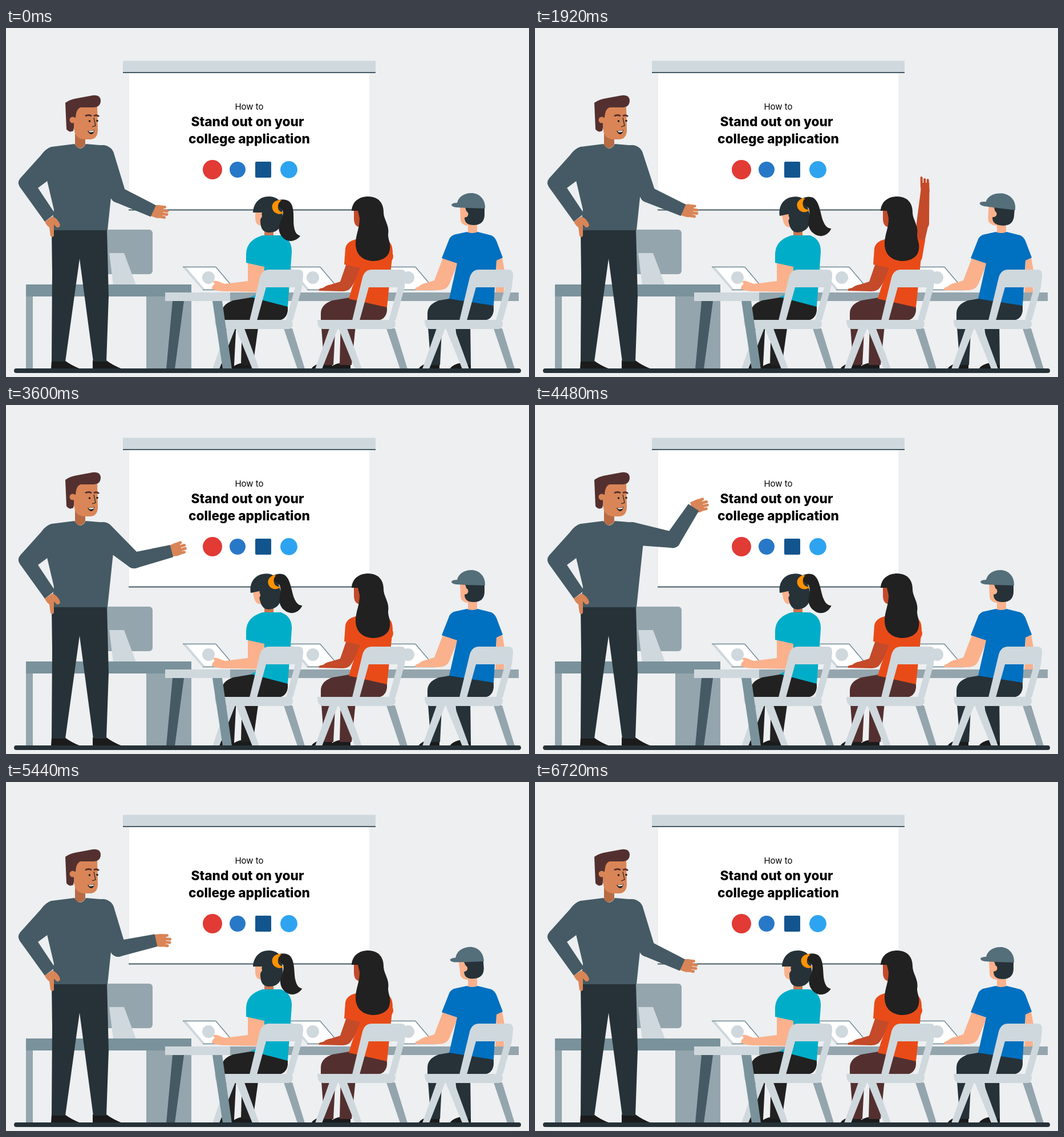
Recreate the animation shown at these times as an HTML page. Size 917 by 611 pixels, loop 8160 ms.

```html
<!DOCTYPE html>
<html lang="en">
<head>
<meta charset="utf-8">
<title>Classroom</title>
<style>
  html, body { margin: 0; width: 100%; height: 100%; overflow: hidden; background: #edeff1; }
  svg { display: block; width: 100vw; height: 100vh; }
  text { font-family: Inter, "Open Sans", sans-serif; text-anchor: middle; fill: #000; }
  .title { font-size: 22.7px; font-weight: 800; }
  .light { fill: #cfd8dd; }
  .grey { fill: #94a5ad; }
  .teal { fill: #7a929b; }
  .slate { fill: #455a64; }
  .navy { fill: #263238; }
  .black { fill: #212121; }
  .shoe { fill: #1b1b1b; }
  .tan { fill: #d98557; }
  .peach { fill: #fab18c; }
  .rust { fill: #c44a29; }
  .brown { fill: #53302f; }
  .cyan { fill: #00adc8; }
  .orange { fill: #e94b18; }
  .blue { fill: #0070c0; }
  .line { fill: none; stroke: #455a64; stroke-width: 2; }
</style>
</head>
<body>
<svg viewBox="0 0 917 611">
  <defs>
    <g id="chair">
      <path class="grey" d="M487 526H502L524 597H511Z"/>
      <path class="light" d="M427 512L445 437Q449 423 461 423H513Q522 423 521 434L519 454 503 512H491L507 454H456L440 512Z"/>
      <path class="light" d="M387 526H402L374 597H362ZM403 526H418L444 597H432Z"/>
      <path class="light" d="M366 511H496Q503 511 503 518T496 527H376Q366 527 366 511Z"/>
    </g>
    <g id="laptop">
      <path d="M310 418H367L401 458H345Z" fill="#fff" stroke="#b4c1c7"/>
      <path class="light" d="M310 418L345 458H349L315 418Z"/>
      <path d="M310 418.500H368L402 458.500H345" fill="none" stroke="#7a929b" stroke-width="1.500"/>
      <circle class="light" cx="355" cy="437" r="11"/>
    </g>
    <path id="thigh" d="M440 470L494 486V495Q492 512 474 512H404L400 590H384L378 511V500Q378 484 398 477Z"/>
    <path id="shoe" d="M384 586H400V597H363Q367 589 384 586Z"/>
    <g id="hand" transform="scale(.9)">
      <path d="M-4 -11L8 -13Q15 -14 19 -9V9Q14 13 6 12L-4 10Z"/>
      <path d="M8 -10L21 -11M14 -4H27M14 2.500H27M13 8.500L23 9" fill="none" stroke="#d98557" stroke-width="5.500" stroke-linecap="round"/>
    </g>
  </defs>

  <rect width="917" height="611" fill="#edeff1"/>

  <!-- screen -->
  <path fill="#fff" d="M216 79H637V318H216Z"/>
  <path class="light" d="M205 57.500H648V78H205Z"/>
  <path class="line" d="M205 78H648M215 318.500H637"/>
  <text x="426.500" y="143" font-size="15">How to</text>
  <text class="title" x="423.500" y="172">Stand out on your</text>
  <text class="title" x="426.500" y="202">college application</text>
  <circle cx="362" cy="248" r="17" fill="#e23a35"/>
  <circle cx="406" cy="248" r="14" fill="#2878c8"/>
  <rect x="437" y="234" width="28" height="28" rx="2" fill="#12558e"/>
  <circle cx="496" cy="248" r="15" fill="#2ea4f0"/>

  <!-- teacher's desk -->
  <rect class="grey" x="150" y="353" width="107" height="78" rx="6"/>
  <path class="light" d="M181 394H207L228 450H188Z"/>
  <path class="grey" d="M35 469H47V597H35ZM246 469H325V597H246Z"/>
  <path class="teal" d="M35 449H325V470H35Z"/>

  <!-- teacher -->
  <path class="shoe" d="M80 582H103Q115 591 131 597H79ZM152 582H176Q188 591 204 597H152Z"/>
  <path class="navy" d="M80 352H177L180 470 176 584H153L129 404 104 584H80L81 430Z"/>
  <path d="M121 180H139V204Q130 217 121 205Z" fill="#b66b44"/>
  <path class="slate" d="M80 208L120 203Q130 219 140 203L175 206 190 240 178 354H80L84 318 72 267 62 222Q70 211 80 208Z"/>
  <path class="slate" d="M80 208Q70 211 62 222L25 263Q19 270 24 278L68 339 86 325 56 280 75 266Z"/>
  <path class="tan" d="M68 339L81 330Q91 333 95 345 94 350 89 349L84 344V364Q81 368 78 364L76 349Q71 346 68 339Z"/>
  <path class="tan" d="M120 137H160L161 180Q160 195 147 195H135Q120 192 120 178Z"/>
  <path class="brown" d="M104 131Q112 125 125 123L152 118Q166 116 166 128 165 139 153 139H131Q123 141 122 157L118 180Q111 184 106 177Z"/>
  <circle class="tan" cx="117" cy="161" r="5.500"/>
  <path class="tan" d="M119 157H125V178H119Z"/>
  <path d="M139 154Q145 151 150 154M154 154Q159 151 163 155" fill="none" stroke="#53302f" stroke-width="2.800"/>
  <path d="M154 157L157 171 151 173" fill="none" stroke="#212121" stroke-width="1.200"/>
  <circle class="black" cx="146.500" cy="163" r="1.800"/>
  <circle class="black" cx="160" cy="162.500" r="1.800"/>
  <path class="black" d="M143 180Q149 181 155 178 154 186 149 186 145 185 143 180Z"/>
  <path d="M145 180.500Q150 181 154 179L153.500 181.500Q149 183 145.500 182Z" fill="#fff"/>
  <g id="palm" class="tan"><use href="#hand"/></g>
  <path id="upper" class="slate"/>
  <path id="fore" class="slate"/>

  <!-- long table -->
  <path class="grey" d="M370 463H899V478H370Z"/>
  <path class="light" d="M279 463H393V478H279Z"/>
  <use href="#laptop"/>
  <use href="#laptop" x="183"/>
  <use href="#laptop" x="350"/>

  <!-- girl with ponytail -->
  <g class="shoe"><use href="#shoe"/><use href="#shoe" x="32"/></g>
  <use href="#thigh" class="black"/>
  <path class="black" d="M414 511H444L433 590H412Z"/>
  <path d="M453 348H469V366H453Z" fill="#c9764f"/>
  <path class="peach" d="M424 410L454 414 448 455Q447 462 438 462L384 461Q371 461 361 457 361 451 366 448L363 444Q366 440 378 446L384 448 424 443Z"/>
  <path class="cyan" d="M450 363H482Q502 370 501 393L494 488 429 471 452 460 453 418 421 411V395Q422 371 450 363Z"/>
  <g id="girl">
    <path class="peach" d="M437 321H458V346H447Q437 345 437 332Z"/>
    <path class="navy" d="M433 323C434 306 445 295 460 295S484 303 484 316L485 330C485 346 478 358 462 358 451 358 446 352 446 336L449 323Z"/>
    <circle class="peach" cx="444" cy="329" r="5"/>
    <path id="tail" class="black" d="M470 303Q488 297 497 304C507 313 503 335 505 348 507 360 511 362 516 364 508 374 497 375 489 370 478 362 476 350 481 340 486 328 487 322 484 318Z"/>
    <path d="M480 301C468 302 464 311 468 319 472 326 482 328 487 323 479 322 476 318 477 311 478 306 480 304 483 302Z" fill="#ff9100"/>
  </g>
  <use href="#chair"/>
  <path class="slate" d="M292 478H312L296 597H281Z"/>
  <path class="teal" d="M362 478H379L396 597H380Z"/>

  <!-- girl with long hair -->
  <g id="raised">
    <path id="arm" class="rust"/>
    <path id="wrist" class="rust"/>
    <g id="fingers" class="rust">
      <path d="M-4 -7.500H13V7.500H-4Z"/>
      <path d="M6 -6H22M12 -.5H19M12 5H18" fill="none" stroke="#c44a29" stroke-width="4" stroke-linecap="round"/>
    </g>
    <path id="sleeve" class="orange"/>
  </g>
  <g class="shoe"><use href="#shoe" x="172"/><use href="#shoe" x="204"/></g>
  <use href="#thigh" x="174" class="brown"/>
  <path class="brown" d="M587 511H614L606 590H585Z"/>
  <path class="rust" d="M597 412L624 418Q612 445 605 454 601 461 590 461L549 460Q546 456 556 455 562 450 570 449L586 444Z"/>
  <path class="orange" d="M613 370H668Q678 378 678 392L668 489 601 474 607 454 621 420 593 414 595 386Q597 374 613 370Z"/>
  <path class="rust" d="M610 318H624V348H617Q610 345 610 334Z"/>
  <path class="black" d="M606 320C607 303 620 295 635 295 655 295 662 309 662 322 662 336 673 345 670 362 670 372 676 378 672 392 668 404 655 408 643 408 624 407 612 395 613 375 614 360 620 350 620 333L617 320Z"/>
  <use href="#chair" x="180"/>

  <!-- boy with cap -->
  <g class="shoe"><use href="#shoe" x="360"/><use href="#shoe" x="415"/></g>
  <use href="#thigh" x="361" class="navy"/>
  <path class="navy" d="M786 511H814L815 590H797Z"/>
  <path class="peach" d="M860 402L870 402 875 430 873 463H858ZM810 338H826V362H810Z"/>
  <path class="peach" d="M767 400L794 408 777 449Q772 459 759 459L718 459Q715 455 723 453 730 447 738 446L751 442Z"/>
  <path class="blue" d="M808 357Q817 361 827 357L851 363Q857 366 860 373L871 402 860 407 855 486 777 474 791 412 764 403 777 370Q779 365 785 362Z"/>
  <g id="boy">
    <path class="peach" d="M796 312H818V346H808Q797 344 797 335Z"/>
    <path class="navy" d="M805 314H839V328Q838 345 820 345 804 345 804 332L809 326Z"/>
    <circle class="peach" cx="805" cy="326" r="5.500"/>
    <path d="M791 306C793 296 803 289 816 289S841 299 840 316L808 315 789 314Q781 313 781 309 783 306 791 306Z" fill="#546e7a"/>
  </g>
  <use href="#chair" x="368"/>

  <rect class="navy" x="14" y="596" width="889" height="8" rx="4"/>
</svg>
<script>
const LOOP = 8160, STEP = 80;
const $ = id => document.getElementById(id);
const set = (id, name, value) => $(id).setAttribute(name, value);
const smooth = p => p * p * (3 - 2 * p);

// Keys are [time, value]; values ease between neighbours.
function track(t, ...keys) {
  let [t0, v0] = keys[0];
  for (const [t1, v1] of keys) {
    if (t < t1) return t <= t0 ? v0 : v0 + (v1 - v0) * smooth((t - t0) / (t1 - t0));
    t0 = t1;
    v0 = v1;
  }
  return v0;
}

function reach([x, y], angle, length) {
  const a = angle * Math.PI / 180;
  return [x + length * Math.cos(a), y + length * Math.sin(a)];
}

// Tapered limb, round at the start and optionally at the end.
function limb([ax, ay], ra, [bx, by], rb, round = true) {
  const d = Math.hypot(bx - ax, by - ay) || 1;
  const nx = (ay - by) / d, ny = (bx - ax) / d;
  const p = (x, y, r) => `${x + nx * r} ${y + ny * r}`;
  const end = round ? `A${rb} ${rb} 0 0 0 ` : 'L';
  return `M${p(ax, ay, ra)}L${p(bx, by, rb)}${end}${p(bx, by, -rb)}L${p(ax, ay, -ra)}A${ra} ${ra} 0 0 0 ${p(ax, ay, ra)}Z`;
}

const place = ([x, y], angle) => `translate(${x} ${y}) rotate(${angle})`;

// Curve through three values at p = 0, 0.5 and 1.
const through = (p, a, b, c) =>
  a * (1 - p) * (1 - 2 * p) + b * 4 * p * (1 - p) + c * p * (2 * p - 1);

function drawTeacher(t) {
  const up = track(t, [1840, 68.3], [2480, 42], [3520, 42], [4240, 9], [4800, 9], [5360, 68.3]);
  const fore = track(t, [1840, 24.8], [2560, 1], [3280, 1], [4240, -57], [4720, -57], [6080, 24.8]);
  const hand = track(t, [1840, 9], [2560, -18], [4240, -15], [4800, -15], [5440, 4], [6080, 9]);
  const shoulder = [170, 225];
  const elbow = reach(shoulder, up, 72);
  const wrist = reach(elbow, fore, 68);
  set('upper', 'd', limb(shoulder, 20, elbow, 14));
  set('fore', 'd', limb(elbow, 14, wrist, 11, false));
  set('palm', 'transform', place(wrist, hand));
}

function drawRaisedArm(t) {
  const p = track(t, [640, 0], [1600, 1], [2720, 1], [3440, 0]);
  const shoulder = [668, 400];
  const elbow = [through(p, 648, 687, 680), through(p, 430, 361, 342)];
  const wrist = [through(p, 640, 670, 684), through(p, 380, 322, 284)];
  const cuff = shoulder.map((v, i) => v + (elbow[i] - v) * .52);
  set('arm', 'd', limb(shoulder, 9, elbow, 10));
  set('wrist', 'd', limb(elbow, 11, wrist, 7.5));
  set('sleeve', 'd', limb(shoulder, 11, cuff, 10, false));
  set('fingers', 'transform', place(wrist, -91));
}

function drawHeads(t) {
  const head = track(t, [560, 0], [1280, -12], [4400, -12], [5200, 0]);
  const tail = track(t, [720, 0], [1520, -13], [4560, -13], [5600, -3]);
  set('girl', 'transform', `rotate(${head} 460 345)`);
  set('tail', 'transform', `rotate(${tail - head} 484 310)`);

  const look = track(t, [400, 0], [1040, 1], [2720, 1], [3440, 0]);
  const nod = track(t, [4800, 0], [5360, 1], [5600, 1], [6320, 0]);
  set('boy', 'transform',
    `translate(${811 - 2 * nod} 316) rotate(${5 * look - 4 * nod}) scale(${1 + .07 * look} 1) translate(-811 -316)`);
}

function frame(now) {
  const t = Math.floor(now % LOOP / STEP) * STEP;
  drawTeacher(t);
  drawRaisedArm(t);
  drawHeads(t);
}

const start = performance.now();
function tick() {
  frame(performance.now() - start);
  requestAnimationFrame(tick);
}
tick();
</script>
</body>
</html>
```
